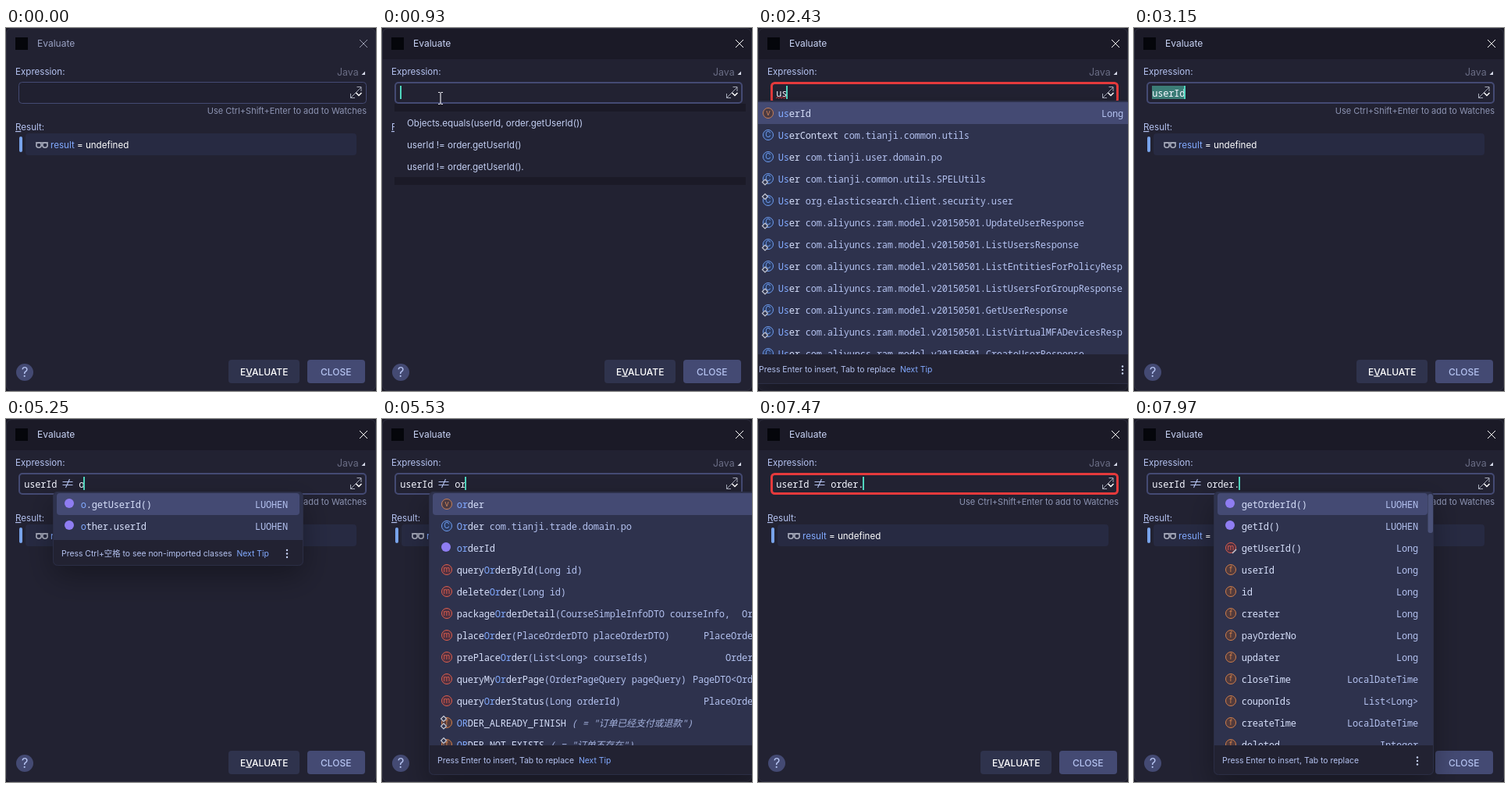
Recreate the animation shown at these times as an HTML page. Size 474 px wide and 465 px high, loop 8 s.

```html
<!DOCTYPE html>
<html lang="en">
<head>
<meta charset="utf-8">
<title>Evaluate dialog</title>
<style>
  html, body { margin: 0; width: 100%; height: 100%; overflow: hidden; background: #1b1a27; }
  svg { display: block; width: 474px; height: 465px; }
  text { font-family: Inter, "Noto Sans CJK SC", "Noto Sans CJK", sans-serif; font-size: 12px; fill: #b4c2f0; white-space: pre; }
  .mono { font-family: "Noto Sans Mono", "Noto Sans CJK SC", "Noto Sans CJK", monospace; font-size: 12px; letter-spacing: -.2px; fill: #d6dffa; }
  .typed { font-weight: 500; fill: #f4f6ff; }
  .body { font-size: 11.6px; }
  .small { font-size: 10.4px; }
  .hit { fill: #82aaff; }
  .dim { fill: #b4c2f0; }
  .note { fill: #a5b3df; font-style: italic; }
  .end { text-anchor: end; }
  .mid { text-anchor: middle; }
</style>
</head>
<body>
<svg id="stage" viewBox="0 0 474 465" xmlns="http://www.w3.org/2000/svg">
  <defs>
    <filter id="shadow" x="-30%" y="-30%" width="160%" height="190%">
      <feDropShadow dx="0" dy="14" stdDeviation="18" flood-color="#000" flood-opacity=".32"/>
    </filter>
  </defs>
  <g id="scene"></g>
  <g id="mouse"></g>
</svg>
<script>
const LOOP = 8000;
const BG = '#222232', DARK = '#1b1a27', PANEL = '#2f334d', ACCENT = '#444a73';
const PITCH = 28, CHAR = 7, FIELD_X = 23;

const esc = s => s.replace(/&/g, '&amp;').replace(/</g, '&lt;');
const rect = (x, y, w, h, fill, r = 0, extra = '') =>
  `<rect x="${x}" y="${y}" width="${w}" height="${h}" rx="${r}" fill="${fill}" ${extra}/>`;
const text = (x, y, s, cls = '', extra = '') =>
  `<text x="${x}" y="${y}" class="${cls}" ${extra}>${s}</text>`;
const line = (d, color, w = 1) =>
  `<path d="${d}" fill="none" stroke="${color}" stroke-width="${w}"/>`;

// Rows: icon kind (+ lower badge, ^ upper badge), name|tail, type.
const ram = 'User| com.aliyuncs.ram.model.v20150501.';
const popups = {
  user: {
    x: -6, w: 486, h: 363, hiX: 0, hiW: 474, icon: 13, textX: 25.7, end: 468, tipX: 1, dots: 467, tip: true,
    rows: [
      ['v', 'userId', 'Long'],
      ['c', 'UserContext| com.tianji.common.utils'],
      ['c', 'User| com.tianji.user.domain.po'],
      ['c+', 'User| com.tianji.common.utils.SPELUtils'],
      ['c^', 'User| org.elasticsearch.client.security.user'],
      ['c+', ram + 'UpdateUserResponse'],
      ['c+', ram + 'ListUsersResponse'],
      ['c+', ram + 'ListEntitiesForPolicyResp'],
      ['c+', ram + 'ListUsersForGroupResponse'],
      ['c+', ram + 'GetUserResponse'],
      ['c+', ram + 'ListVirtualMFADevicesResp'],
      ['c+', ram + 'CreateUserResponse']
    ]
  },
  ai: {
    x: 60, w: 321, h: 95, hiX: 65, hiW: 311, icon: 82, textX: 95.7, end: 361, tipX: 71, dots: 360, tip: true,
    hint: 'Press Ctrl+空格 to see non-imported classes',
    rows: [['a', 'o.getUserId()', 'LUOHEN'], ['a', 'other.userId', 'LUOHEN']]
  },
  order: {
    x: 60, w: 424, h: 363, hiX: 65, hiW: 420, icon: 83, textX: 95.7, end: 475, tipX: 71, tip: true,
    rows: [
      ['v', 'order'],
      ['c', 'Order| com.tianji.trade.domain.po'],
      ['a', 'orderId'],
      ['m', 'queryOrderById|(Long id)'],
      ['m', 'deleteOrder|(Long id)'],
      ['m', 'packageOrderDetail|(CourseSimpleInfoDTO courseInfo,', 'Or'],
      ['m', 'placeOrder|(PlaceOrderDTO placeOrderDTO)', 'PlaceOrde'],
      ['m', 'prePlaceOrder|(List<Long> courseIds)', 'Order'],
      ['m', 'queryMyOrderPage|(OrderPageQuery pageQuery)', 'PageDTO<Ord'],
      ['m', 'queryOrderStatus|(Long orderId)', 'PlaceOrde'],
      ['f+^', 'ORDER_ALREADY_FINISH| ( = "订单已经支付或退款")'],
      ['f+^', 'ORDER_NOT_EXISTS| ( = "订单不存在")']
    ]
  },
  members: {
    x: 102, w: 282, h: 363, hiX: 107, hiW: 269, icon: 124, textX: 137.7, end: 364, tipX: 113, dots: 363, thumb: true,
    rows: [
      ['a', 'getOrderId()', 'LUOHEN'], ['a', 'getId()', 'LUOHEN'], ['m+', 'getUserId()', 'Long'],
      ['f', 'userId', 'Long'], ['f', 'id', 'Long'], ['f', 'creater', 'Long'],
      ['f', 'payOrderNo', 'Long'], ['f', 'updater', 'Long'], ['f', 'closeTime', 'LocalDateTime'],
      ['f', 'couponIds', 'List<Long>'], ['f', 'createTime', 'LocalDateTime'], ['f', 'deleted', 'Integer']
    ]
  }
};

// Start time, field text, flags (a popup name is also a flag).
const U = 'userId != ';
const steps = [
  [0, '', 'idle blink'],
  [600, '', 'history'],
  [980, '', ''],
  [1730, '', 'blink'],
  [2120, 'u', ''],
  [2250, 'u', 'user red'],
  [2380, 'us', 'user red'],
  [2590, 'use', 'user red'],
  [2740, 'user', 'user red'],
  [3150, 'userId', 'sel'],
  [3660, 'userId ', ''],
  [4050, 'userId !', ''],
  [4260, 'userId !=', 'red'],
  [4430, U, 'red'],
  [5070, U + 'o', 'red'],
  [5160, U + 'o', 'ai fade'],
  [5250, U + 'o', 'ai'],
  [5440, U + 'or', 'order'],
  [6190, U + 'ord', 'order'],
  [6330, U + 'orde', 'order'],
  [6470, U + 'order', 'order'],
  [6600, U + 'order', 'order sel'],
  [7270, U + 'order', 'order sel blink'],
  [7470, U + 'order.', 'red'],
  [7840, U + 'order.', 'members red'],
  [7970, U + 'order.', 'members']
];

const iconColors = {
  v: ['#4a3a42', '#c9825c'], c: ['#2b3a60', '#6f9df0'],
  m: ['#4c2f40', '#e0604f'], f: ['#513a3c', '#d07f4c']
};

function icon(kind, x, y) {
  if (kind[0] === 'a') return `<circle cx="${x - 1}" cy="${y - 1}" r="6" fill="#8f7df2"/>`;
  const [fill, stroke] = iconColors[kind[0]];
  const letter = kind[0] === 'c' ? 'C' : kind[0];
  let s = `<circle cx="${x}" cy="${y}" r="6.5" fill="${fill}" stroke="${stroke}"/>` +
    text(x, y + 3.4, letter, 'mid', `style="font-size:10px;fill:${stroke}"`);
  const badge = (bx, by) =>
    `<path d="M${bx} ${by - 3.5}l3.5 3.5l-3.5 3.5l-3.5 -3.5z" fill="${PANEL}" stroke="#c5c8d4" stroke-width="1.2"/>`;
  if (kind.includes('+')) {
    s += kind[0] === 'm' ? line(`M${x + 2} ${y + 7}l5 -5`, '#c5c8d4', 1.5) : badge(x - 4, y + 4.5);
  }
  if (kind.includes('^')) s += badge(x - 4, y - 5);
  return s;
}

function rowLabel(label, prefix) {
  const [name, tail = ''] = label.split('|');
  const at = prefix ? name.toLowerCase().indexOf(prefix.toLowerCase()) : -1;
  const end = at + prefix.length;
  const head = at < 0 ? esc(name)
    : `${esc(name.slice(0, at))}<tspan class="hit">${name.slice(at, end)}</tspan>${esc(name.slice(end))}`;
  const cls = tail.startsWith(' (') ? 'note' : 'dim';
  return `${head}<tspan class="${cls}">${esc(tail)}</tspan>`;
}

function popup(name, prefix, fade) {
  const p = popups[name], top = 93, foot = top + p.h - (name === 'ai' ? 33 : 38);
  let s = rect(p.x, top, p.w, p.h, PANEL, 6, 'filter="url(#shadow)"');
  s += `<clipPath id="rows"><rect x="${p.x}" y="${top}" width="${p.w}" height="${foot - top}"/></clipPath>`;
  s += `<g clip-path="url(#rows)">` + rect(p.hiX, 95, p.hiW, PITCH, ACCENT, p.hiX ? 4 : 0);
  p.rows.forEach(([kind, label, type], i) => {
    const y = 109 + i * PITCH;
    s += icon(kind, p.icon, y) + text(p.textX, y + 4.5, rowLabel(label, prefix), 'mono');
    if (type) s += text(p.end, y + 4.5, esc(type), 'mono dim end');
  });
  if (p.thumb) s += rect(376.5, 96, 6.5, 50, '#4b5279', 3);
  s += '</g>';
  const r = 6, right = p.x + p.w, bottom = top + p.h;
  s += `<path d="M${p.x} ${foot}H${right}V${bottom - r}q0 ${r} ${-r} ${r}H${p.x + r}q${-r} 0 ${-r} ${-r}z" fill="${BG}"/>`;
  s += rect(p.x + .5, top + .5, p.w - 1, p.h - 1, 'none', 6, 'stroke="#2b2e45"');
  const y = (foot + bottom) / 2 + 1;
  const hint = p.hint || 'Press Enter to insert, Tab to replace';
  s += text(p.tipX, y + 3, hint + (p.tip ? '<tspan class="hit" dx="6">Next Tip</tspan>' : ''), 'small');
  if (p.dots) for (const d of [-4.5, 0, 4.5])
    s += `<circle cx="${p.dots}" cy="${y + d}" r="1.2" fill="#c8d3f5"/>`;
  return `<g opacity="${fade ? .55 : 1}">${s}</g>`;
}

function dialog(idle) {
  const tone = idle ? '#9a9db0' : '#ffffff';
  return rect(0, 0, 474, 465, BG, 7) +
    (idle ? '' : `<path d="M0 40V7q0 -7 7 -7H467q7 0 7 7V40z" fill="${DARK}"/>`) +
    rect(.5, .5, 473, 464, 'none', 7, 'stroke="#2d2e3e"') +
    rect(12, 12, 16, 16, '#05060b') +
    text(40, 24, 'Evaluate', '', `style="fill:${idle ? '#9aa2c4' : '#c8d3f5'}"`) +
    line('M453 15l10 10M463 15l-10 10', tone) +
    text(12, 60, 'Expression:', 'body') +
    text(424, 61, 'Java', '', 'style="font-size:12.4px;fill:#696c84"') +
    '<path d="M460 55.500v4.500h-4.500z" fill="#d5d9e8"/>' +
    text(462, 110, 'Use Ctrl+Shift+Enter to add to Watches', 'end', 'style="font-size:11px;fill:#8d94b3"') +
    text(12, 131, '<tspan text-decoration="underline">R</tspan>esult:', 'body') +
    rect(17, 139, 4, 20, '#78a3ea', 2) +
    rect(25, 135, 424, 28, '#272a42', 4) +
    '<g fill="none" stroke="#a4a8b8" stroke-width="1.600"><circle cx="42" cy="150" r="3.200"/>' +
    '<circle cx="50" cy="150" r="3.200"/><path d="M38 147h16"/></g>' +
    text(57, 153.5, '<tspan class="hit">result</tspan><tspan fill="#fff"> = undefined</tspan>', 'body') +
    '<circle cx="24" cy="441" r="11" fill="#444a73"/>' +
    text(24, 447, '?', 'mid', 'style="font-size:17px"') +
    rect(285, 425, 91, 30, PANEL, 4) +
    text(300, 444.5, 'E<tspan text-decoration="underline">V</tspan>ALUATE', '', 'style="font-weight:500;fill:#fff"') +
    rect(386, 425, 74, 30, ACCENT, 4) +
    text(403, 444.5, 'CLOSE', '', 'style="font-weight:500"');
}

function field(value, on) {
  const word = value.split(' ').pop(), n = value.length;
  const w = on('idle') ? 1 : on('red') ? 3 : 2;
  let s = rect(16 + w / 2, 69 + w / 2, 446 - w, 28 - w, on('idle') ? '#202030' : BG, 4,
    `stroke="${on('red') ? '#e53a3c' : ACCENT}" stroke-width="${w}"`);
  if (on('sel')) s += rect(FIELD_X + (n - word.length) * CHAR, 74, word.length * CHAR, 17, '#3b7c76');
  s += text(FIELD_X + .3, 87.5, value.replace('!=', '\u00a0\u00a0'), 'mono typed');
  if (value.includes('!=')) s += line('M72.500 80.500H85.500M72.500 84.500H85.500M81.500 77L76.500 88', '#b4c2f0', 1.1);
  if (on('user')) s += line(`M${FIELD_X} 90` + 'l1.75 -1.5l1.75 1.5'.repeat(n * 2), '#e53a3c');
  if (!on('blink')) s += rect(Math.max(FIELD_X, FIELD_X - 1 + n * CHAR), 74, 2, 17, '#4fd6be');
  return s + line('M441.500 84v5.500h5.500M441.500 89.500L455 76M449.500 75.500h5.500v5.500', '#a7abba') +
    line('M448.500 83l3.500 3.500l3.500 -3.500', '#fff', 1.5);
}

function history() {
  const items = ['Objects.equals(userId, order.getUserId())',
    'userId != order.getUserId()', 'userId != order.getUserId().'];
  return rect(16, 97, 450, 104, DARK) + rect(16, 107, 450, 84, BG) +
    items.map((s, i) => text(32, 126 + i * PITCH, s, 'body', 'style="fill:#c3cff3"')).join('');
}

function scene([, value, flags]) {
  const set = flags.split(' '), on = f => set.includes(f);
  const open = Object.keys(popups).find(on);
  const prefix = value.split(/[ .]/).pop();
  return dialog(on('idle')) + field(value, on) + (on('history') ? history() : '') +
    (open ? popup(open, prefix, on('fade')) : '');
}

const path = [[180, 474, 389], [600, 75, 90], [930, 75, 90], [1080, 75, 87.5], [1220, 75, 87.5], [1370, 75, 82.5], [2120, 75, 82.5]];

function pointer(t) {
  const i = path.findIndex(p => p[0] > t);
  if (i < 1) return '';
  const [t0, x0, y0] = path[i - 1], [t1, x1, y1] = path[i];
  const k = (t - t0) / (t1 - t0), e = k * k * (3 - 2 * k);
  const x = x0 + (x1 - x0) * e, y = y0 + (y1 - y0) * e;
  const shape = y < 97
    ? line('M-3 -7.500H-.500M.500 -7.500H3M0 -7V7M-3 7.500H-.500M.500 7.500H3', '#e8e8ee', 1.2)
    : '<path d="M0 0V15l3.500 -3.300l2.300 5.200l2.200 -1l-2.300 -5h4.800z" fill="#fff" stroke="#111"/>';
  return `<g transform="translate(${x.toFixed(1)} ${y.toFixed(1)})">${shape}</g>`;
}

const sceneEl = document.getElementById('scene'), mouseEl = document.getElementById('mouse');
const start = performance.now();
let shown = null;

function draw() {
  const t = (performance.now() - start) % LOOP;
  const step = steps.filter(s => s[0] <= t).pop();
  if (step !== shown) sceneEl.innerHTML = scene(shown = step);
  mouseEl.innerHTML = pointer(t);
  requestAnimationFrame(draw);
}
draw();
</script>
</body>
</html>
```
